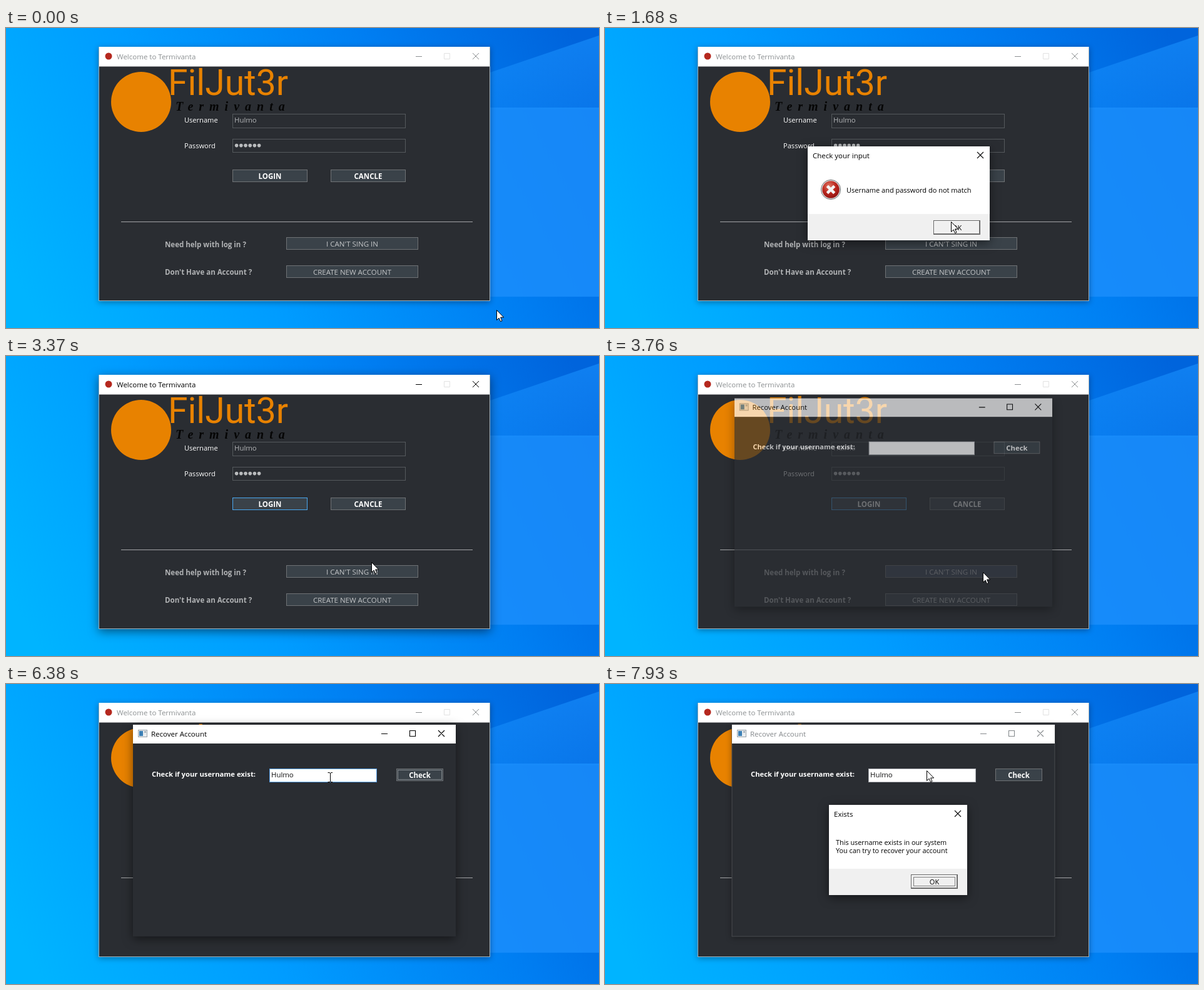
An HTML page that plays this animation: 948 by 479 pixels, repeating every 8 s.

```html
<!DOCTYPE html>
<html lang="en">
<head>
<meta charset="utf-8">
<title>Login demo</title>
<style>
html, body { margin: 0; width: 100%; height: 100%; overflow: hidden; background: #008cfa; }
svg { display: block; width: 100vw; height: 100vh; }
text { font-family: "Open Sans", "Noto Sans", sans-serif; white-space: pre; }
.low { filter: drop-shadow(0 2px 5px rgba(0,0,0,.35)); }
.high { filter: drop-shadow(0 4px 8px rgba(0,0,0,.5)); }
</style>
</head>
<body>
<svg id="stage" viewBox="0 0 948 479" preserveAspectRatio="none"></svg>
<script>
const LOOP = 8000, STEP = 76.75;
const DARK = '#2a2d32', USER = 'Hulmo';

// Markup helpers
const rect = (x, y, w, h, fill, more = '') =>
  `<rect x="${x}" y="${y}" width="${w}" height="${h}" fill="${fill}" ${more}/>`;
const box = (x, y, w, h, fill, stroke, more = '') =>
  rect(x + .5, y + .5, w - 1, h - 1, fill, `stroke="${stroke}" ${more}`);
const text = (x, y, str, size, fill, more = '') =>
  `<text x="${x}" y="${y}" font-size="${size}" fill="${fill}" ${more}>${str}</text>`;
const line = (d, stroke, more = '') => `<path d="${d}" fill="none" stroke="${stroke}" ${more}/>`;
const cross = (x, y, r) => `M${x - r} ${y - r}l${2 * r} ${2 * r}m0 ${-2 * r}l${-2 * r} ${2 * r}`;
const bold = 'font-weight="700"', mid = 'text-anchor="middle"';

function button(x, y, w, label, id, more = '', fill = '#c4c6c8') {
  return box(x, y, w, 20, '#3a4249', '#6f7275', `id="${id}"`) +
    text(x + w / 2, y + 14.6, label, 11.5, fill, `${mid} ${more}`);
}

function okButton(x, y, id) {
  return `<g id="${id}">` + box(x, y, 75, 23, '#f0f0f0', '#646464') +
    line(`M${x + 1.5} ${y + 21}V${y + 1.5}H${x + 73}`, '#fff') +
    line(`M${x + 1} ${y + 21.5}H${x + 73.5}V${y + 1}`, '#777', 'class="edge"') +
    text(x + 37.5, y + 15.5, 'OK', 11, '#000', mid) + '</g>';
}

function dialog(id, x, y, w, h, strip, title, body) {
  return `<g id="${id}">` + rect(x, y, w, h, '#fff', 'class="high"') +
    rect(x, y + strip, w, h - strip, '#f0f0f0') +
    text(x + 8, y + 19, title, 11.5, '#000') +
    line(cross(x + w - 15, y + 14, 5), '#111', 'stroke-width="1.2"') + body + '</g>';
}

const backdrop = `
<defs>
  <linearGradient id="sky" gradientUnits="userSpaceOnUse" x1="60" y1="479" x2="900" y2="0">
    <stop offset="0" stop-color="#00b4ff"/><stop offset=".35" stop-color="#009cff"/>
    <stop offset=".7" stop-color="#007ef2"/><stop offset="1" stop-color="#0064dc"/>
  </linearGradient>
  <linearGradient id="beam-light" x1="0" y1="0" x2="0" y2="1">
    <stop offset="0" stop-color="#1a92ff" stop-opacity=".6"/>
    <stop offset="1" stop-color="#1a92ff" stop-opacity=".35"/>
  </linearGradient>
  <radialGradient id="badge" cx=".4" cy=".3" r=".75">
    <stop offset="0" stop-color="#e07a68"/><stop offset=".5" stop-color="#bd2a20"/>
    <stop offset="1" stop-color="#8e1010"/>
  </radialGradient>
</defs>` +
  rect(0, 0, 948, 479, 'url(#sky)') +
  '<path d="M948 12V130H700V96Z" fill="url(#beam-light)"/>' +
  rect(672, 127, 302, 302, '#1a8dfc', 'opacity=".85"');

const mainWindow =
  rect(148.5, 30.5, 625, 405, DARK, 'id="mainBase" stroke="#a3b3be"') +
  rect(149, 30, 624, 31.5, '#fff') + '<circle cx="164" cy="45" r="5.5" fill="#b5281e"/>' +
  '<g id="mainTitle">' + text(177, 50, 'Welcome to Termivanta', 11.5, 'currentColor') +
  line('M655 45.5h10' + cross(751, 45, 5), 'currentColor') + '</g>' +
  line('M700.5 40.5h9v9h-9z', '#e2e2e2') +
  '<circle cx="216" cy="118" r="48" fill="#e88200"/>' +
  text(259, 107, 'FilJut3r', 57, '#e88200', 'style="font-family:Roboto,sans-serif"') +
  text(271, 132, 'Termivanta', 20, '#050505',
    'letter-spacing="9" style="font-family:\'Liberation Serif\',serif;font-style:italic;font-weight:700"') +
  text(285, 151, 'Username', 11.1, '#fff') + text(285, 192, 'Password', 11.1, '#fff') +
  box(362, 137, 277, 23, 'none', '#55595d') + box(362, 177, 277, 22, 'none', '#55595d') +
  text(365, 151, USER, 11.4, '#b4b6b8') +
  [0, 1, 2, 3, 4, 5].map(i => `<circle cx="${368.6 + i * 7.2}" cy="187.6" r="2.8" fill="#b9bbbd"/>`).join('') +
  button(362, 226, 120, 'LOGIN', 'login', bold, '#fff') +
  button(519, 226, 120, 'CANCLE', 'cancel', bold, '#fff') +
  line('M184 309.5H746', '#a3a5a7') +
  text(254, 350, 'Need help with log in ?', 11.5, '#b0b2b4', bold) +
  text(254, 394, "Don't Have an Account ?", 11.5, '#b0b2b4', bold) +
  button(448, 334, 211, "I CAN'T SING IN", 'help') +
  button(448, 379, 211, 'CREATE NEW ACCOUNT', 'create');

const errorIcon = '<circle cx="361" cy="258" r="15.6" fill="#dcdcdc" stroke="#777"/>' +
  '<circle cx="361" cy="258" r="13.7" fill="url(#badge)"/>' +
  line(cross(361, 258, 5.7), '#f4f4f4', 'stroke-width="4.6"');

const errorBox = dialog('error', 324, 189, 291, 150, 108, 'Check your input',
  errorIcon + text(386, 263, 'Username and password do not match', 11, '#000') +
  okButton(525, 307, 'okError'));

const recover = '<g id="recover">' +
  rect(203, 65, 516, 338, DARK, 'id="recBase"') +
  rect(203, 65, 516, 30, '#fff') +
  box(211, 73, 15, 12, '#e8ecef', '#9aa4ab') + rect(213, 75, 6, 8, '#3b7fb5') +
  rect(221, 75, 3, 3, '#a8b4bc') +
  '<g id="recTitle">' + text(232, 84, 'Recover Account', 11.5, 'currentColor') +
  line('M600 79.5h10M645.5 74.5h9v9h-9z' + cross(696, 79, 5), 'currentColor', 'stroke-width="1.1"') + '</g>' +
  text(233, 148, 'Check if your username exist:', 11.25, '#fff', bold) +
  box(421, 135, 172, 22, '#fff', '#abadb3', 'id="field"') +
  text(424, 149, '', 11.4, '#111', 'id="typed"') +
  rect(424, 137, 1, 15, '#000', 'id="caret"') +
  button(624, 135, 75, 'Check', 'check', bold, '#fff') +
  box(626, 137, 71, 16, 'none', '#c8cacc', 'id="checkFocus" stroke-dasharray="1 1"') + '</g>';

const existsBox = dialog('exists', 358, 193, 221, 144, 102, 'Exists',
  text(369, 257, 'This username exists in our system', 10.85, '#000') +
  text(369, 270, 'You can try to recover your account', 10.85, '#000') +
  okButton(489, 304, 'okExists') +
  box(493, 308, 67, 15, 'none', '#111', 'stroke-dasharray="1 1"'));

const pointers =
  '<circle id="click" r="11.8" fill="#fbee21" opacity=".8"/>' +
  '<path id="arrow" d="M.5 .5V16.4L4.1 13L6.6 18.6L9 17.5L6.6 12H11.7Z" fill="#fff" stroke="#000"/>' +
  line('M-3.5 -7.5H-1L.5 -6.5L2 -7.5H4M.5 -6.5V6.5M-3.5 7.5H-1L.5 6.5L2 7.5H4', '#000', 'id="beam"');

document.getElementById('stage').innerHTML =
  backdrop + mainWindow + errorBox + recover + existsBox + pointers;

const el = {};
document.querySelectorAll('#stage [id]').forEach(e => el[e.id] = e);

// Time, x, y of the pointer
const path = [
  [0, 784, 450], [384, 426, 235], [1140, 426, 235], [1610, 511, 292], [1690, 553, 309],
  [1880, 566, 316], [2250, 559, 260], [2456, 565, 271], [2916, 565, 313], [3180, 565, 313],
  [3580, 604, 345], [3860, 604, 345], [4600, 518, 149], [6600, 518, 149],
  [6610, 516, 148], [7925, 516, 148], [7930, 514, 138]
];
const keys = [5770, 5850, 5920, 6080, 6230];

const clamp = v => Math.max(0, Math.min(1, v));
const ease = p => p * p * (3 - 2 * p);
const within = (t, a, b) => t >= a && t < b;
const show = (e, on) => e.style.display = on ? '' : 'none';
const set = (e, name, value) => e.setAttribute(name, value);

function pointerAt(s) {
  const i = path.findIndex(k => k[0] > s);
  if (i < 0) return path[path.length - 1].slice(1);
  const [t0, x0, y0] = path[i - 1], [t1, x1, y1] = path[i];
  const p = ease((s - t0) / (t1 - t0));
  return [x0 + (x1 - x0) * p, y0 + (y1 - y0) * p];
}

// Windows fade while growing slightly around their centre
function reveal(e, p, cx, cy) {
  const k = .952 + .048 * p;
  show(e, p > 0);
  set(e, 'opacity', p);
  set(e, 'transform', `translate(${cx} ${cy}) scale(${k}) translate(${-cx} ${-cy})`);
}

function draw(t) {
  const s = Math.floor((t + 14) / STEP) * STEP;
  const opened = start => clamp((s - start) / 200);

  const mainActive = within(t, 840, 915) || within(t, 3140, 3690);
  set(el.mainTitle, 'color', mainActive ? '#000' : '#8c9092');
  set(el.mainBase, 'class', mainActive ? 'high' : 'low');
  set(el.login, 'stroke', within(t, 370, 920) ? '#9aa3aa' : t >= 3140 ? '#4aa8f0' : '#6f7275');
  set(el.help, 'fill', within(t, 3500, 4000) ? '#3e465a' : '#3a4249');

  reveal(el.error, s < 3090 ? opened(863) : 1 - opened(3090), 469, 263.5);
  reveal(el.recover, opened(3625), 461, 234);
  reveal(el.exists, opened(6545), 468.5, 265);
  set(el.okError.querySelector('.edge'), 'stroke', within(t, 3060, 3140) ? '#aaa' : '#777');

  const recActive = t < 6600;
  set(el.recTitle, 'color', recActive ? '#000' : '#85898c');
  set(el.recBase, 'class', recActive ? 'high' : 'low');
  set(el.recBase, 'stroke', recActive ? 'none' : '#4a4d51');

  const count = keys.filter(k => t >= k).length;
  el.typed.textContent = USER.slice(0, count);
  show(el.caret, within(t, 4620, 5160) || within(t, 5690, 6380));
  set(el.caret, 'x', 424 + (count ? Math.round(el.typed.getComputedTextLength()) : 0));
  set(el.field, 'stroke', within(t, 4600, 6600) ? '#569de5' : '#abadb3');
  show(el.checkFocus, within(t, 6380, 6600));

  const [x, y] = pointerAt(t >= 6600 ? t : s).map(Math.round);
  const typing = within(t, 5770, 6380);
  const overField = s > 4400 && t < 6600 && y > 135 && y < 157;
  [el.arrow, el.beam, el.click].forEach(e => set(e, 'transform', `translate(${x} ${y})`));
  show(el.arrow, !overField);
  show(el.beam, overField && !typing);
  show(el.click, within(t, 840, 915) || within(t, 3060, 3140) || within(t, 3600, 3680) || within(t, 4600, 4670));
}

function frame(now) {
  draw(now % LOOP);
  requestAnimationFrame(frame);
}
draw(0);
requestAnimationFrame(frame);
</script>
</body>
</html>
```
